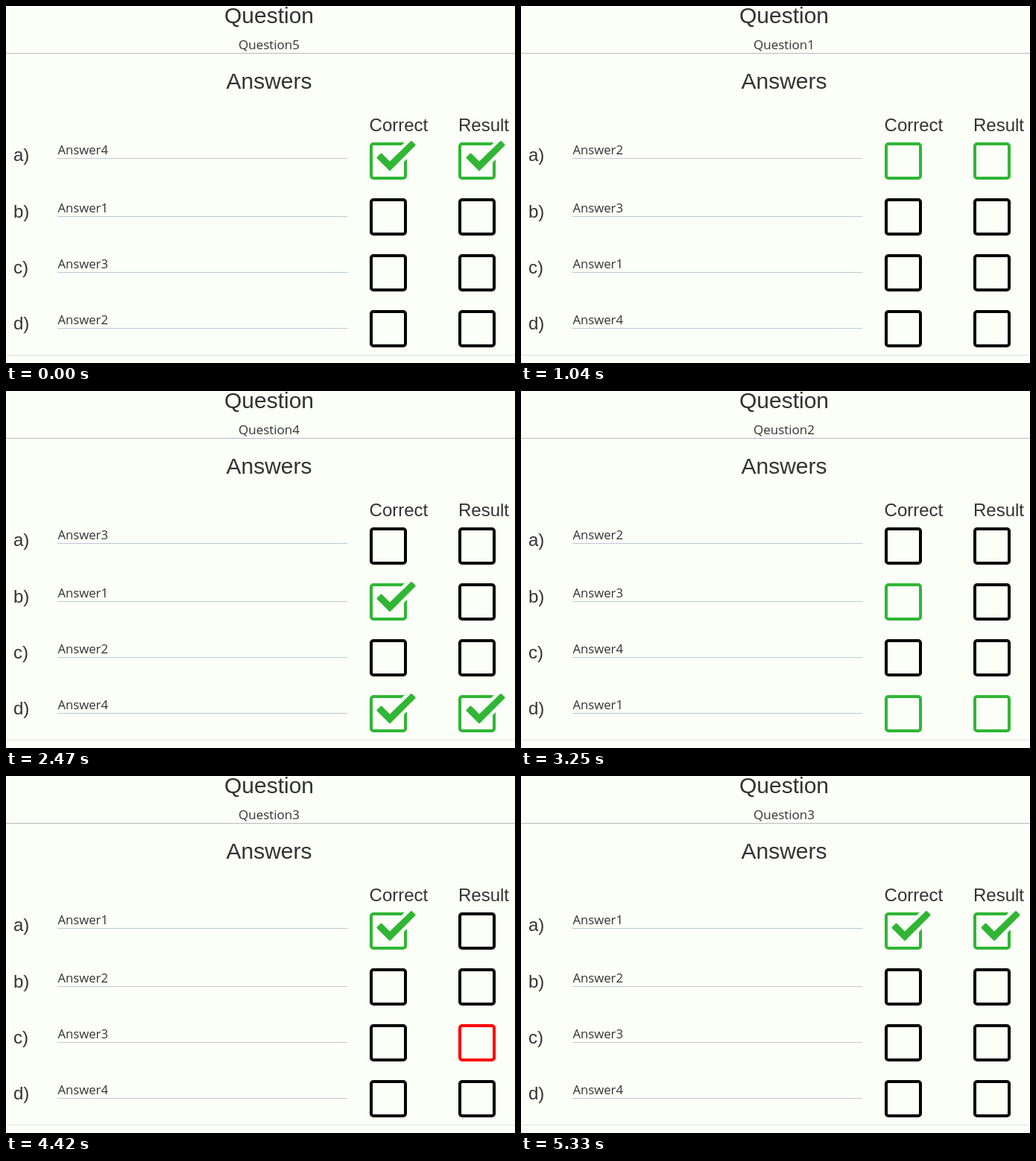
An HTML page that plays this animation: 683x479 px, repeating every 5.46 s.

```html
<!DOCTYPE html>
<html lang="en">
<head>
<meta charset="utf-8">
<title>Quiz</title>
<style>
html, body { margin: 0; width: 100%; height: 100%; overflow: hidden; background: #fcfef8; }
svg { display: block; }
text { fill: #333; }
.head { font: 30px "Liberation Sans", Arial, sans-serif; text-anchor: middle; }
.label { font: 24px "Liberation Sans", Arial, sans-serif; }
.answer { font: 16.7px "Open Sans", sans-serif; }
.question { font: 17px "Open Sans", sans-serif; text-anchor: middle; }
</style>
</head>
<body>
<svg id="stage" width="683" height="479" viewBox="0 0 683 479"></svg>
<script>
const LOOP = 5460, STEP = 130;
const BG = '#fcfef8', GREEN = [48, 182, 52], RED = [255, 0, 0], BLACK = [0, 0, 0];
const TICK = 'M56 -.5 60 3.5 27 36.5 11 20.5 15.5 16 27 27.5Z';
const stage = document.getElementById('stage');

// at: start time, order: answer numbers, right: correct rows, pick: chosen row
const quiz = [
  { at: 0, title: 'Question5', order: [4, 1, 3, 2], right: [0], pick: 0 },
  { at: 1040, title: 'Question1', order: [2, 3, 1, 4], right: [2, 3], pick: 1 },
  { at: 2210, title: 'Question4', order: [3, 1, 2, 4], right: [1, 3], pick: 3 },
  { at: 3250, title: 'Qeustion2', order: [2, 3, 4, 1], right: [0], pick: 2 },
  { at: 4420, title: 'Question3', order: [1, 2, 3, 4], right: [0], pick: 0 }
];

function add(tag, attrs, parent = stage) {
  const el = document.createElementNS('http://www.w3.org/2000/svg', tag);
  for (const k in attrs) el.setAttribute(k, attrs[k]);
  parent.appendChild(el);
  return el;
}

function write(cls, x, y, str = '') {
  const el = add('text', { class: cls, x, y });
  el.textContent = str;
  return el;
}

const rule = (x, y, w, fill) => add('rect', { x, y, width: w, height: 1, fill });

function makeBox(x, y, shift) {
  const g = add('g', { transform: `translate(${x} ${y})` });
  const frame = add('rect', { x: 2, y: 2, width: 46, height: 46, rx: 3, fill: 'none', 'stroke-width': 4 }, g);
  const tick = add('g', { transform: `translate(${shift} 0)`, 'stroke-linejoin': 'round' }, g);
  add('path', { d: TICK, fill: BG, stroke: BG, 'stroke-width': 12 }, tick);
  const mark = add('path', { d: TICK, 'stroke-width': 3 }, tick);
  return { frame, tick, mark };
}

write('head', 353, 23, 'Question');
const title = write('question', 353, 58);
rule(0, 63, 683, '#b4bac2');
write('head', 353, 111, 'Answers');
write('label', 487.6, 168, 'Correct');
write('label', 607, 168, 'Result');
rule(0, 468, 683, '#dfe5e2');

const rows = [0, 1, 2, 3].map(i => {
  const top = 183 + 75 * i;
  const base = i ? top + 19 : 199;
  write('label', 10, top + (i ? 26 : 25), 'abcd'[i] + ')');
  rule(69, base + 5, 389, '#bcc8d4');
  return {
    text: write('answer', 69.5, base),
    boxes: [makeBox(488, top, 0), makeBox(607, top, 1)]
  };
});

const pointer = add('g', {});
add('circle', { cx: 90, cy: 461, r: 25, fill: '#fff746' }, pointer);
add('path', {
  d: 'M89.5 460.5v16l3.7-3.4 2.6 6 2.6-1.1-2.6-5.8h5z',
  fill: '#fff', stroke: '#111', 'stroke-width': 1
}, pointer);

// Colour of a ticked box, or null when it is empty
function ink(q, row, col) {
  const right = q.right.includes(row);
  if (col === 0) return right ? GREEN : null;
  if (q.pick !== row) return null;
  return right ? GREEN : RED;
}

const mix = (a, b, k) => `rgb(${a.map((v, i) => Math.round(v + (b[i] - v) * k))})`;

function paintBox(box, was, now, k) {
  box.frame.setAttribute('stroke', mix(was || BLACK, now || BLACK, k));
  const fill = `rgb(${now || BLACK})`;
  box.mark.setAttribute('fill', fill);
  box.mark.setAttribute('stroke', fill);
  box.tick.setAttribute('opacity', now ? (was ? 1 : k) : 0);
}

function render(ms) {
  const t = Math.floor((ms % LOOP) / STEP) * STEP;
  let n = quiz.length - 1;
  while (quiz[n].at > t) n--;
  const q = quiz[n], prev = quiz[(n + quiz.length - 1) % quiz.length];
  const k = Math.min(1, (t - q.at) / (2 * STEP));
  title.textContent = q.title;
  rows.forEach((r, i) => {
    r.text.textContent = 'Answer' + q.order[i];
    r.boxes.forEach((b, c) => paintBox(b, ink(prev, i, c), ink(q, i, c), k));
  });
  pointer.setAttribute('visibility', t === 4680 ? 'visible' : 'hidden');
}

const start = performance.now();
function loop() {
  render(performance.now() - start);
  requestAnimationFrame(loop);
}
render(0);
requestAnimationFrame(loop);
</script>
</body>
</html>
```
